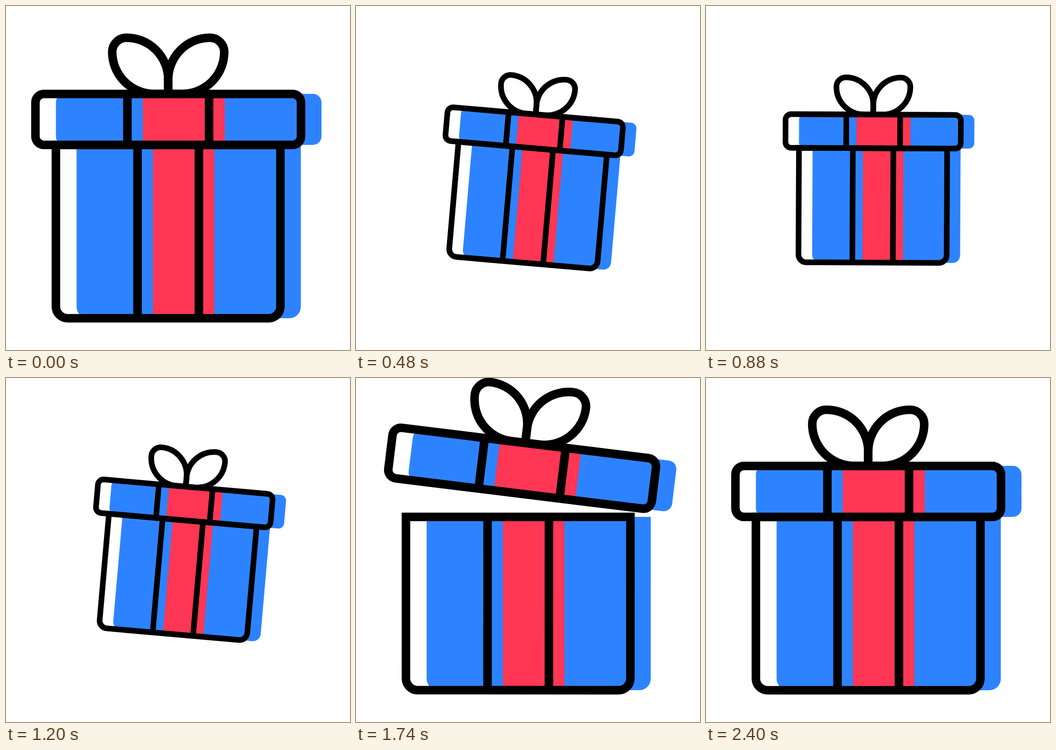
An HTML page for the animation above (2.44 s loop, 748 px wide and 748 px high).

```html
<!DOCTYPE html>
<html lang="en">
<head>
<meta charset="utf-8">
<title>Gift box</title>
<style>
  html, body { margin: 0; width: 100%; height: 100%; overflow: hidden; background: #fff; }
  svg { display: block; width: 100%; height: 100%; }
  .blue { fill: #2d83ff; }
  .red { fill: #ff3654; }
  .line { fill: none; stroke: #000; stroke-width: 18.6; }
</style>
</head>
<body>
<svg viewBox="0 0 748 748">
  <g id="gift">
    <path class="blue" d="M153.5 302H641V654a25 25 0 0 1-25 25H178.500a25 25 0 0 1-25-25Z"/>
    <path class="red" d="M319.500 302H453V679H319.500Z"/>
    <path class="line" d="M108.500 302H596.700V653.500a25.500 25.500 0 0 1-25.500 25.500H134a25.500 25.500 0 0 1-25.500-25.500ZM286 302V679M419.500 302V679"/>
    <g id="lid">
      <rect class="blue" x="108.500" y="191" width="577.500" height="111" rx="18.500"/>
      <path class="red" d="M297.500 191H475.500V302H297.500Z"/>
      <rect class="line" x="64" y="191.200" width="577.500" height="110.800" rx="18.500"/>
      <path class="line" d="M264 191V302M441.500 191V302"/>
      <path id="bow" class="line" d="M352.750 191V160A91 91 0 0 0 262 69A31 31 0 0 0 231 100A91 91 0 0 0 322 191H352.750"/>
      <use href="#bow" transform="matrix(-1 0 0 1 705.500 0)"/>
    </g>
  </g>
</svg>
<script>
const LOOP = 2440, DELAY = 7;
const gift = document.getElementById('gift');
const lid = document.getElementById('lid');

// [start, duration, value to reach]
const shrink = [[0, 600, 1], [1200, 600, 0]];
const open = [[1200, 600, 1], [1800, 600, 0]];
const tilt = [
  [0, 600, 5],
  [600, 120, -2.5], [720, 120, 5], [840, 120, -2.5], [960, 120, 5],
  [1200, 600, 0]
];

const easeOut = u => 1 - (1 - u) ** 3;

function valueAt(steps, t) {
  let value = 0;
  for (const [start, duration, target] of steps) {
    if (t <= start) break;
    value += (target - value) * easeOut(Math.min(1, (t - start) / duration));
  }
  return value;
}

function draw(now) {
  const t = now % LOOP - DELAY;
  const s = valueAt(shrink, t);
  const o = valueAt(open, t);
  gift.setAttribute('transform',
    `translate(${370.5 + 3.4 * s} ${689 - 124.4 * s}) rotate(${valueAt(tilt, t)}) ` +
    `scale(${1 - 0.34 * s}) translate(-370.5 -689)`);
  lid.setAttribute('transform',
    `translate(${8.5 * o} ${-50.5 * o}) rotate(${7 * o} 352.75 246.5)`);
}

const begin = performance.now();
function tick() {
  draw(performance.now() - begin);
  requestAnimationFrame(tick);
}
tick();
</script>
</body>
</html>
```
